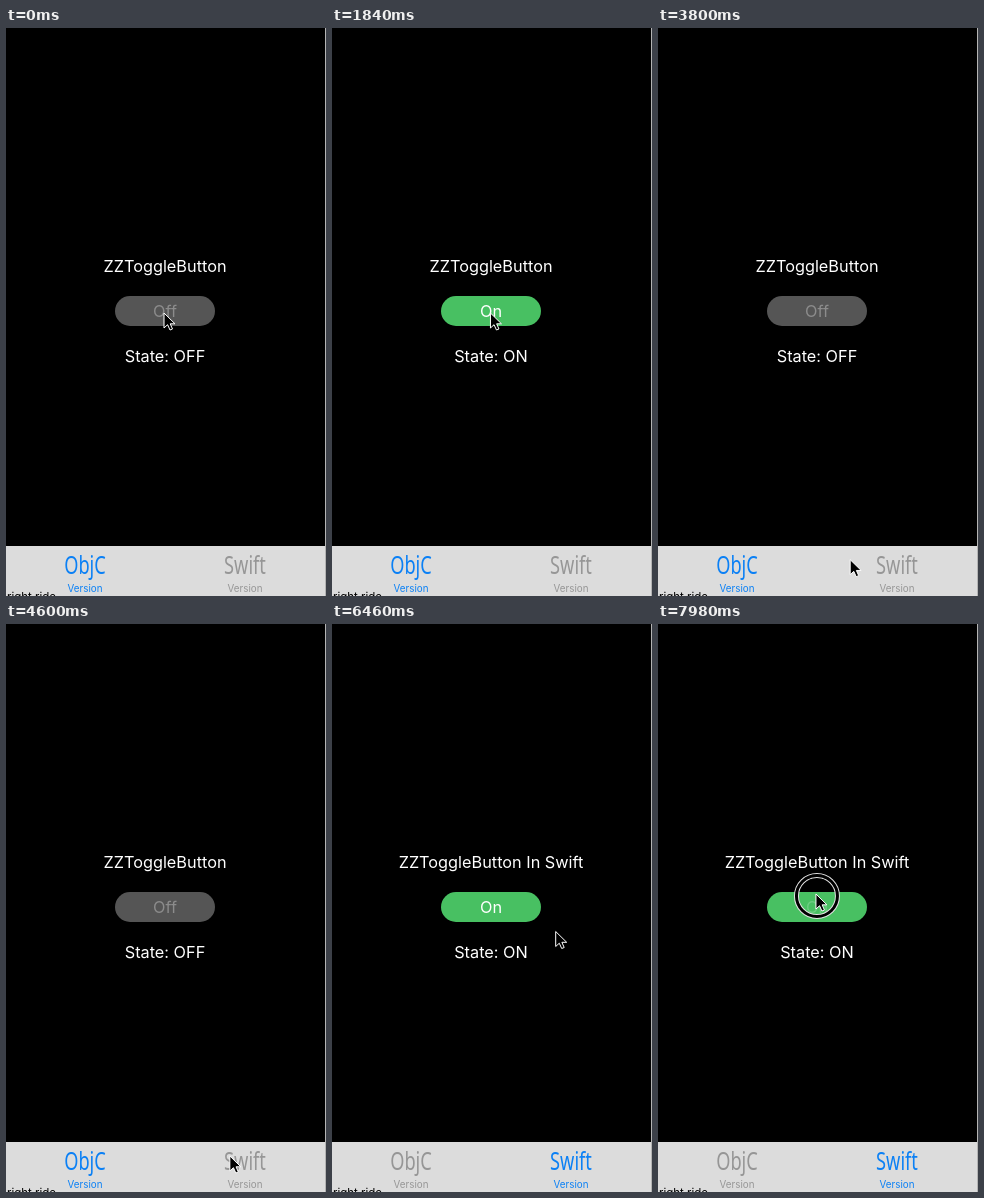
An HTML page that plays this animation: 320x568 px, repeating every 8000 ms.

```html
<!DOCTYPE html>
<html lang="en">
<head>
<meta charset="utf-8">
<title>Toggle button demo</title>
<style>
html, body { margin: 0; width: 100%; height: 100%; overflow: hidden; background: #000; }
svg { display: block; width: 320px; height: 568px; }
text { font: 16.3px Inter, Roboto, sans-serif; fill: #fff; text-anchor: middle; }
.icon { font: 26px "Noto Sans", "Open Sans", sans-serif; }
.caption { font-size: 9.8px; }
.tab text { fill: #969696; }
.tab.selected text { fill: #0b80f5; }
</style>
</head>
<body>
<svg viewBox="0 0 320 568">
  <rect width="320" height="568"/>
  <text id="title" x="159" y="243.5"></text>
  <rect id="button" x="109" y="268" width="100" height="30" rx="15"/>
  <text id="label" x="159" y="288.7"></text>
  <text id="state" x="159" y="333.7"></text>

  <rect y="518" width="320" height="50" fill="#dcdcdc"/>
  <rect x="319" width="1" height="568" fill="#b4b4b4"/>
  <text x="1" y="573" style="font-size:11.5px;fill:#000;text-anchor:start">right ride</text>
  <g id="objc" class="tab">
    <text class="icon" transform="translate(79 545.5) scale(.7 1)">ObjC</text>
    <text class="caption" x="79" y="563.5">Version</text>
  </g>
  <g id="swift" class="tab">
    <text class="icon" transform="translate(239 545.5) scale(.7 1)">Swift</text>
    <text class="caption" x="239" y="563.5">Version</text>
  </g>

  <g id="cursor">
    <g id="ring" fill="none" transform="translate(1 2)">
      <circle r="20.5" stroke="#e4e4e4" stroke-width="5"/>
      <circle r="20.5" stroke="#000" stroke-width="3"/>
    </g>
    <path d="M0 0V15L3.6 11.7L6 17L8.5 16L6.2 10.8H11Z" fill="#000" stroke="#fff"/>
  </g>
</svg>
<script>
const DURATION = 8000, PRESS = 140;
const TURN_ON = 300, TURN_OFF = 2080, OPEN_SWIFT = 4900, LAST_PRESS = 7920;
const el = id => document.getElementById(id);

// Smooth step from 0 to 1 around the time mid
const glide = (t, mid, spread) => 1 / (1 + Math.exp((mid - t) / spread));

// From the button to the Swift tab and back
const pointerX = t => 158 + 77 * glide(t, 3890, 400) - 78 * glide(t, 6900, 246);
const pointerY = t => 285 + 247 * (glide(t, 3230, 87) - glide(t, 6230, 100))
  - 15 * glide(t, 7500, 80);

function draw(t) {
  const released = start => t >= start + PRESS;
  const pressing = start => t >= start && !released(start);
  const inSwift = released(OPEN_SWIFT);
  const on = inSwift || (released(TURN_ON) && !released(TURN_OFF));
  const buttonPressed = [TURN_ON, TURN_OFF, LAST_PRESS].some(pressing);

  el('title').textContent = 'ZZToggleButton' + (inSwift ? ' In Swift' : '');
  el('label').textContent = on ? 'On' : 'Off';
  el('state').textContent = 'State: ' + (on ? 'ON' : 'OFF');
  el('button').style.fill = on ? '#48c062' : '#555';
  el('label').style.fill = on ? '#fff' : '#8c8c8c';
  el('label').style.opacity = buttonPressed ? .2 : 1;
  el('objc').classList.toggle('selected', !inSwift);
  el('swift').classList.toggle('selected', inSwift);
  el('ring').style.display = buttonPressed || pressing(OPEN_SWIFT) ? '' : 'none';
  el('cursor').setAttribute('transform', `translate(${pointerX(t)} ${pointerY(t)})`);
}

let start;
function frame(now) {
  start ??= now;
  draw((now - start) % DURATION);
  requestAnimationFrame(frame);
}
draw(0);
requestAnimationFrame(frame);
</script>
</body>
</html>
```
